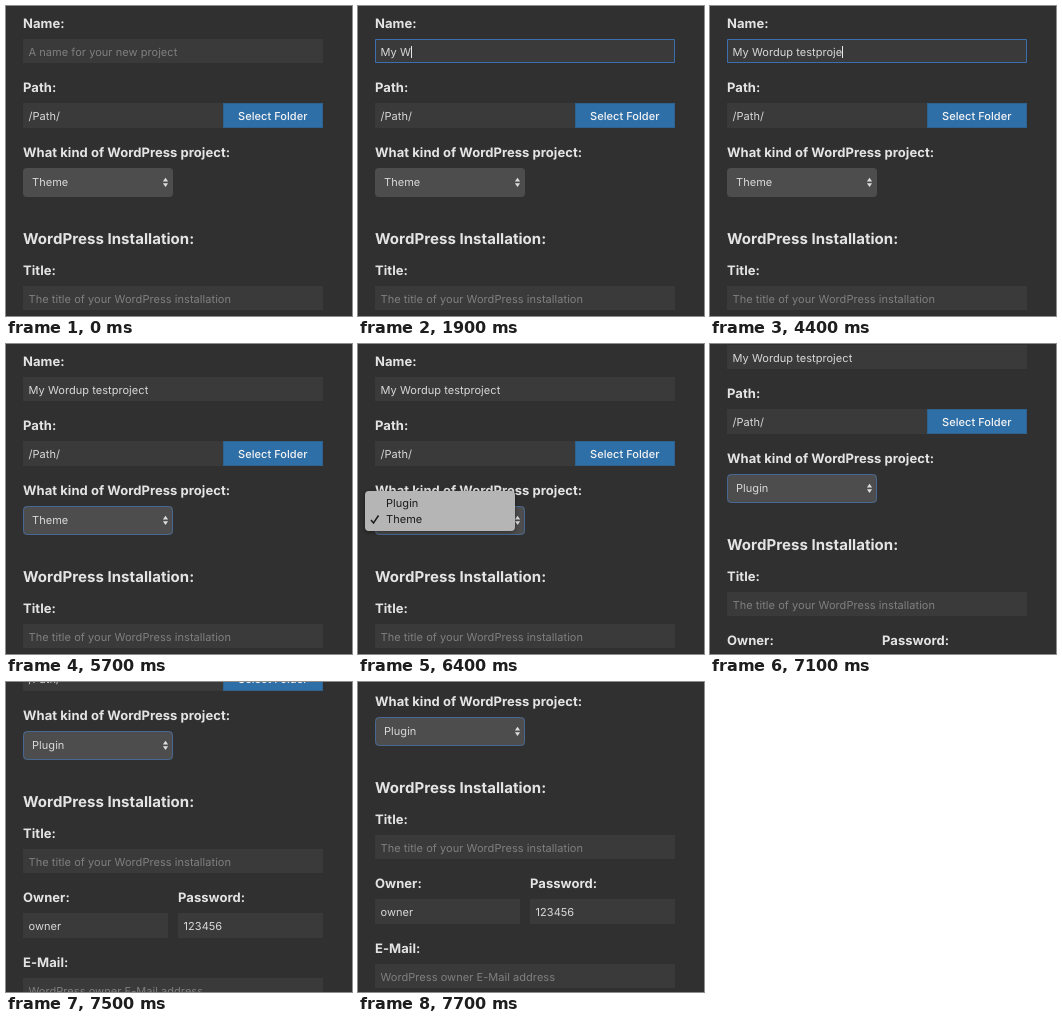
An HTML page with a canvas for the animation above (8000 ms loop, 346 by 310 pixels).

```html
<!DOCTYPE html>
<html lang="en">
<head>
<meta charset="utf-8">
<title>New project form</title>
<style>
  html, body { margin: 0; width: 100%; height: 100%; overflow: hidden; background: #303030; }
  canvas { display: block; width: 346px; height: 310px; }
</style>
</head>
<body>
<canvas id="stage"></canvas>
<script>
const W = 346, H = 310, LOOP = 8000;
const FONT = 'Inter, Roboto, sans-serif';
const C = {
  bg: '#303030', field: '#3a3a3a', text: '#d8d8d8', hint: '#7f7f7f', label: '#e4e4e4',
  button: '#2f6fa8', buttonEdge: '#2f628f', focus: '#3a6fae', select: '#4d4d4d', selectFocus: '#466892',
  menu: '#b5b5b5', ink: '#1c1c1c', hover: '#3478e5'
};

const canvas = document.getElementById('stage');
const ctx = canvas.getContext('2d');
const dpr = window.devicePixelRatio || 1;
canvas.width = W * dpr;
canvas.height = H * dpr;
ctx.textRendering = 'geometricPrecision';
ctx.letterSpacing = '0.05px';

const PHRASE = 'My Wordup testproject';
// time at which each character of the phrase is typed
const KEYS = [1100, 1200, 1500, 1900, 2100, 2200, 2300, 2400, 2700, 2900,
  3100, 3200, 3300, 3400, 3900, 4000, 4200, 4300, 4400, 4600, 4800];
const FOCUS = 500, CARET_OFF = 5300, BLUR = 5700, OPEN = 5800, CLOSED = 6700;
const SCROLL_START = 7100, SCROLL = [32, 58, 82, 100, 113, 122, 127];

function text(str, x, y, color = C.text, size = 11, weight = 400) {
  ctx.font = `${weight} ${size}px ${FONT}`;
  ctx.fillStyle = color;
  ctx.fillText(str, x, y);
}

const label = (str, x, y, size = 13) => text(str, x, y, C.label, size, 700);

function box(x, y, w, h, color) {
  ctx.fillStyle = color;
  ctx.fillRect(x, y, w, h);
}

function outline(x, y, w, h, r, color) {
  ctx.beginPath();
  ctx.roundRect(x + 0.5, y + 0.5, w - 1, h - 1, r);
  ctx.strokeStyle = color;
  ctx.lineWidth = 1;
  ctx.stroke();
}

function rounded(x, y, w, h, r, color) {
  ctx.beginPath();
  ctx.roundRect(x, y, w, h, r);
  ctx.fillStyle = color;
  ctx.fill();
}

function field(x, y, w, h, value, color) {
  box(x, y, w, h, C.field);
  text(value, x + 5.5, y + 17, color);
}

function nameField(t) {
  const typed = PHRASE.slice(0, KEYS.filter(k => t >= k).length);
  field(17, 33, 300, 24, typed || 'A name for your new project', typed ? C.text : C.hint);
  if (t < FOCUS || t >= BLUR) return;
  outline(17, 33, 300, 24, 0, C.focus);
  if (t < CARET_OFF) box(Math.round(22.5 + ctx.measureText(typed).width), 40, 1, 12, '#e8e8e8');
}

function triangle(x, y, dir) {
  ctx.beginPath();
  ctx.moveTo(x - 2.6, y);
  ctx.lineTo(x + 2.6, y);
  ctx.lineTo(x, y - 3.8 * dir);
  ctx.fillStyle = '#dedede';
  ctx.fill();
}

function select(t) {
  rounded(17, 162, 150, 29, 4, C.select);
  if (t >= BLUR) outline(17, 162, 150, 29, 4, C.selectFocus);
  text(t < CLOSED ? 'Theme' : 'Plugin', 26, 180);
  triangle(159.5, 175.5, 1);
  triangle(159.5, 177.3, -1);
}

function menu(t) {
  if (t < OPEN || t >= CLOSED) return;
  const blink = t >= 6400 && t < 6500;
  const active = blink ? -1 : t < 6000 ? 1 : 0;
  ctx.save();
  if (t >= 6600) ctx.globalAlpha = 0.45;
  ctx.shadowColor = 'rgba(0,0,0,0.45)';
  ctx.shadowBlur = 4 * dpr;
  ctx.shadowOffsetY = dpr;
  rounded(7, 147, 150, 40, 4, C.menu);
  ctx.shadowColor = 'transparent';
  if (active >= 0) box(7, 151 + 16 * active, 150, 16, C.hover);
  ['Plugin', 'Theme'].forEach((name, i) =>
    text(name, 28, 163 + 16 * i, i === active ? '#fff' : C.ink));
  ctx.beginPath();
  ctx.moveTo(13, 176);
  ctx.lineTo(15.5, 179);
  ctx.lineTo(20.5, 171.5);
  ctx.strokeStyle = active === 1 ? '#fff' : C.ink;
  ctx.lineWidth = 1.5;
  ctx.stroke();
  ctx.restore();
}

function draw(t) {
  const step = Math.floor((t - SCROLL_START) / 100);
  const scroll = step < 0 ? 0 : SCROLL[Math.min(step, SCROLL.length - 1)];
  ctx.setTransform(dpr, 0, 0, dpr, 0, 0);
  box(0, 0, W, H, C.bg);
  ctx.translate(0, -scroll);

  label('Name:', 17, 22);
  nameField(t);

  label('Path:', 17, 86);
  field(17, 97, 200, 25, '/Path/', C.text);
  box(217, 97, 100, 25, C.button);
  outline(217, 97, 100, 25, 0, C.buttonEdge);
  text('Select Folder', 232, 114, '#f4f4f4', 11, 500);

  label('What kind of WordPress project:', 17, 151);
  select(t);

  label('WordPress Installation:', 17, 238, 15);
  label('Title:', 17, 269);
  field(17, 280, 300, 24, 'The title of your WordPress installation', C.hint);

  label('Owner:', 17, 333);
  field(17, 344, 145, 25, 'owner', C.text);
  label('Password:', 172, 333);
  field(172, 344, 145, 25, '123456', C.text);

  label('E-Mail:', 17, 398);
  field(17, 409, 300, 24, 'WordPress owner E-Mail address', C.hint);

  menu(t);
}

const start = performance.now();
function tick() {
  draw((performance.now() - start) % LOOP);
  requestAnimationFrame(tick);
}
tick();
</script>
</body>
</html>
```
